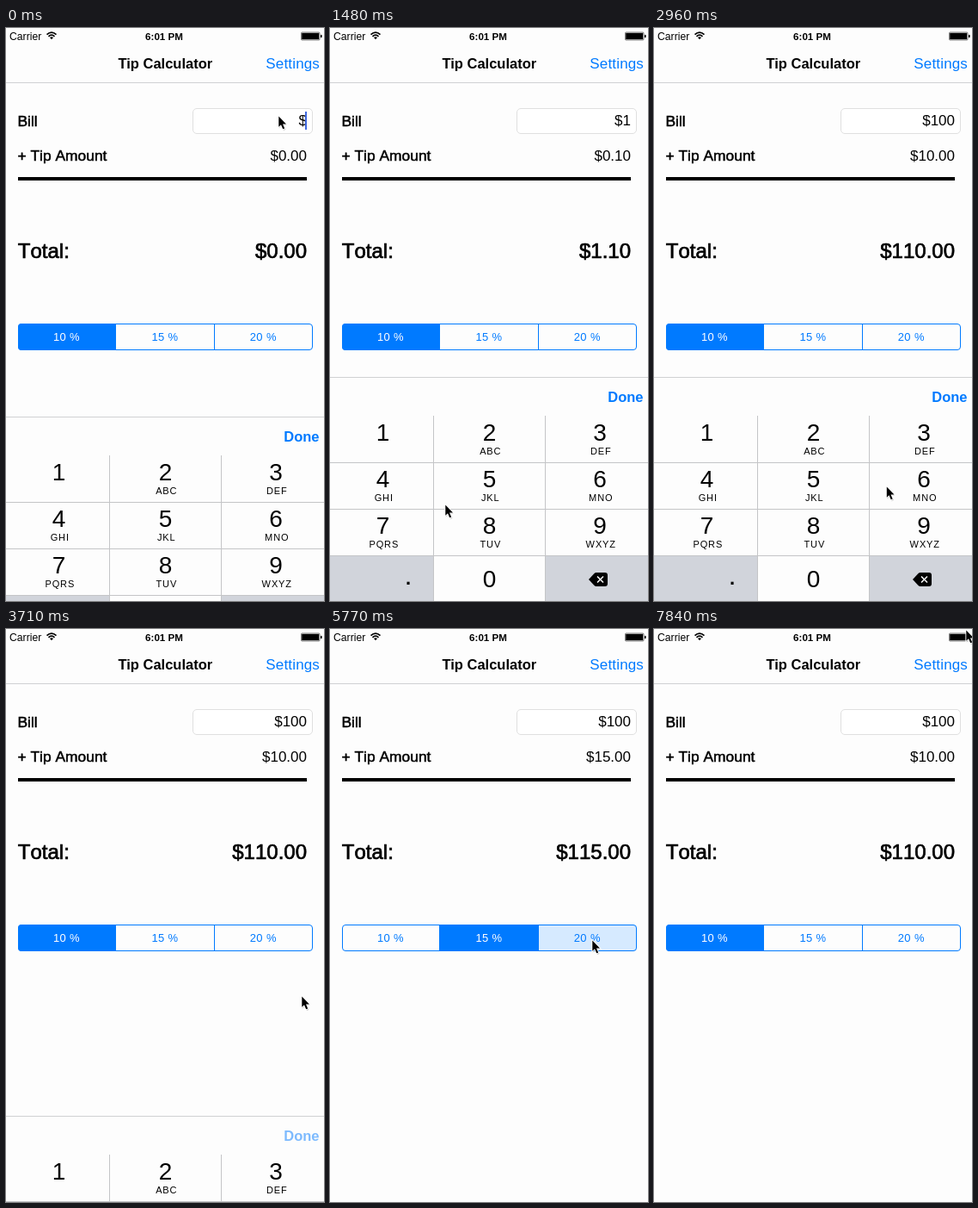
An HTML page that plays this animation: 370x665 px, repeating every 8000 ms.

```html
<!DOCTYPE html>
<html lang="en">
<head>
<meta charset="utf-8">
<title>Tip Calculator</title>
<style>
  html, body { margin: 0; width: 100%; height: 100%; overflow: hidden; background: #fdfdfd; }
  svg { display: block; width: 370px; height: 665px; font: 17px "Liberation Sans", Arial, sans-serif; }
  .bold { font-weight: bold; font-size: 16.5px; }
  .medium { font-size: 17.4px; stroke: #000; stroke-width: .03em; font-kerning: none; }
  .total { font-size: 24px; }
  .num { font-kerning: none; text-anchor: end; }
  .blue { fill: #007aff; }
  .end { text-anchor: end; }
  .mid { text-anchor: middle; }
  .seg { font-size: 13px; letter-spacing: .35px; text-anchor: middle; }
  .digit { font-size: 28px; text-anchor: middle; }
  .sub { font-size: 11px; letter-spacing: .9px; text-anchor: middle; }
  .line { stroke: #c4c5c7; fill: none; }
  .faint { stroke: #d0d1d3; }
</style>
</head>
<body>
<svg viewBox="0 0 370 665">
  <rect width="370" height="665" fill="#fdfdfd"/>

  <g id="status">
    <text x="4" y="13.5" font-size="12.2">Carrier</text>
    <g fill="none" stroke="#000" stroke-width="1.7">
      <path d="M47.5 7.6Q53 2.6 58.5 7.6M49.5 9.8Q53 6.6 56.5 9.8"/>
      <path d="M51 11.1Q53 9.6 55 11.1L53 13.2Z" fill="#000" stroke="none"/>
    </g>
    <text class="mid" x="184" y="13.5" font-size="11.6" font-weight="bold">6:01 PM</text>
    <rect x="344.2" y="5.8" width="20" height="7.4"/>
    <rect x="343.5" y="5" width="21.500" height="9" rx="1" fill="none" stroke="#000" stroke-opacity=".5"/>
    <rect x="366" y="7.8" width="1.6" height="3.4" rx=".8"/>
  </g>

  <text class="bold mid" x="185.3" y="47">Tip Calculator</text>
  <text class="blue end" x="365" y="47" letter-spacing=".15">Settings</text>
  <path class="line faint" d="M0 63.5H370"/>

  <text class="medium" x="13.5" y="114">Bill</text>
  <rect x="217.5" y="93.5" width="139" height="29" rx="4.5" fill="#fff" stroke="#e0e0e0"/>
  <text id="bill" class="num" x="350" y="113"></text>
  <rect id="caret" x="348" y="97" width="2" height="21" fill="#4069e0"/>
  <text class="medium" x="13.5" y="154">+ Tip Amount</text>
  <text id="tip" class="num" x="350" y="154"></text>
  <rect x="14" y="173" width="336" height="4"/>
  <text class="medium total" x="13.8" y="267">Total:</text>
  <text id="sum" class="medium total num" x="350" y="267"></text>

  <clipPath id="round"><rect x="14" y="343" width="343" height="31" rx="4"/></clipPath>
  <g id="segs" clip-path="url(#round)"></g>
  <path d="M127.5 343.5V373.5M242.5 343.5V373.5" stroke="#007aff"/>
  <rect x="14.5" y="343.5" width="342" height="30" rx="3.5" fill="none" stroke="#007aff"/>

  <g id="pad">
    <rect y="405" width="370" height="262" fill="#fdfdfd"/>
    <path class="line faint" d="M0 405.5H370"/>
    <text id="done" class="bold blue end" x="364.5" y="434">Done</text>
    <g id="keys"></g>
    <path class="line" d="M0 504.5H370M0 558.5H370M0 612.5H370M120.5 450V665M250.5 450V665"/>
    <text class="mid" x="91" y="646" font-size="22" font-weight="bold">.</text>
    <path d="M301 640L307.5 633Q308.5 632 310 632H320Q323 632 323 635V645Q323 648 320 648H310Q308.5 648 307.5 647Z"/>
    <path d="M311 636.5L318 643.5M318 636.5L311 643.5" stroke="#fff" stroke-width="1.5"/>
  </g>

  <g id="cursor">
    <path d="M.6 1.5V14.5L3.6 12L6 17L8.5 16L6.3 10.800H10Z" opacity=".2"/>
    <path d="M.3 .5V12.8L3 10.300L5.200 15.300L7.200 14.400L5 9.600H9Z" stroke="#fff" stroke-width="1.800" paint-order="stroke"/>
  </g>
</svg>
<script>
const LOOP = 8000, STEP = 148, LAST = 53, DONE = 24;
const BLUE = '#007aff', PALE = '#d6eaff', GREY = '#d1d4db', WHITE = '#fdfdfd';
const $ = id => document.getElementById(id);

function add(parent, tag, attrs, text = '') {
  const el = document.createElementNS('http://www.w3.org/2000/svg', tag);
  for (const name in attrs) el.setAttribute(name, attrs[name]);
  el.textContent = text;
  return parent.appendChild(el);
}

// The pointer travels to each stop between two steps and taps there.
const stops = [
  { from: 0, to: 0, x: 317, y: 102 },
  { from: 0, to: 4, x: 147, y: 354 },
  { from: 4, to: 6, x: 71, y: 468, key: '1', taps: [6] },
  { from: 8, to: 12, x: 197, y: 638, key: '0', taps: [12, 14] },
  { from: 17, to: 23, x: 344, y: 426 },
  { from: 25, to: 31, x: 185, y: 364, seg: 1, taps: [33] },
  { from: 34, to: 38, x: 305, y: 361, seg: 2, taps: [39] },
  { from: 42, to: 45, x: 68, y: 352, seg: 0, taps: [51] },
  { from: 51, to: 53, x: 363, y: 1 }
];
const taps = stops.flatMap(({ key, seg, taps = [] }) => taps.map(at => ({ at, key, seg })));
const keyTaps = taps.filter(t => t.key);
const segTaps = [{ at: -9, seg: 0 }, ...taps.filter(t => t.seg >= 0)];

const rates = [10, 15, 20];
const segs = rates.map((rate, i) => ({
  box: add($('segs'), 'rect', { x: 13 + 114.5 * i, y: 343, width: 115, height: 31 }),
  label: add($('segs'), 'text', { class: 'seg', x: 70.5 + 114.4 * i, y: 363 }, rate + ' %')
}));

const keys = {};
const cols = [0, 120, 250, 370], centers = [61.5, 185.5, 314];
'1,2 ABC,3 DEF,4 GHI,5 JKL,6 MNO,7 PQRS,8 TUV,9 WXYZ,,0,'.split(',').forEach((key, i) => {
  const [digit, letters] = key.split(' ');
  const c = i % 3, y = 450 + 54 * Math.floor(i / 3);
  const box = add($('keys'), 'rect', {
    x: cols[c], y, width: cols[c + 1] - cols[c], height: 55, fill: key ? WHITE : GREY
  });
  if (!key) return;
  keys[digit] = box;
  add($('keys'), 'text', { class: 'digit', x: centers[c], y: y + (digit === '0' ? 37 : 29) }, digit);
  if (letters) add($('keys'), 'text', { class: 'sub', x: centers[c] + 1.3, y: y + 45 }, letters);
});

const clamp = u => Math.min(1, Math.max(0, u));
const easeOut = (u, power) => 1 - (1 - clamp(u)) ** power;
const money = n => '$' + n.toFixed(2);
const move = (id, x, y) => $(id).setAttribute('transform', `translate(${x} ${y})`);

function cursorAt(k) {
  let { x, y } = stops[0];
  for (const s of stops.slice(1)) {
    const u = clamp((k - s.from) / (s.to - s.from)), e = u * u * (3 - 2 * u);
    x += (s.x - x) * e;
    y += (s.y - y) * e;
  }
  return [x, y];
}

function padOffset(k) {
  return Math.floor(46 * (1 - easeOut(k / 3, 3)) + 262 * easeOut((k - DONE) / 4, 3.3));
}

// The caret blinks and starts over with each key tap.
function caretOn(k) {
  const last = Math.max(0, ...keyTaps.map(t => t.at).filter(at => at <= k));
  return k <= DONE && (k - last) % 7 < 4;
}

function draw(k) {
  const now = taps.find(t => t.at === k) || {};
  const [pick, before] = segTaps.filter(t => t.at < k).reverse();
  const fading = pick.at === k - 1 ? before.seg : -1;
  const bill = keyTaps.filter(t => t.at < k).map(t => t.key).join('');
  const tip = bill * rates[pick.seg] / 100;

  $('bill').textContent = '$' + bill;
  $('tip').textContent = money(tip);
  $('sum').textContent = money(+bill + tip);
  $('caret').style.opacity = +caretOn(k);
  segs.forEach(({ box, label }, i) => {
    const on = i === pick.seg;
    box.setAttribute('fill', on ? BLUE : i === now.seg || i === fading ? PALE : WHITE);
    label.setAttribute('fill', on ? '#fff' : BLUE);
  });
  for (const d in keys) keys[d].setAttribute('fill', d === now.key ? GREY : WHITE);
  $('done').style.opacity = k > DONE ? .5 : 1;
  move('pad', 0, padOffset(k));
  move('cursor', ...cursorAt(k));
}

// The screen updates in even steps, like a low-rate recording.
let shown = -1;
function frame() {
  const k = Math.min(LAST, Math.floor((performance.now() % LOOP + 14) / STEP));
  if (k !== shown) draw(shown = k);
  requestAnimationFrame(frame);
}
frame();
</script>
</body>
</html>
```
